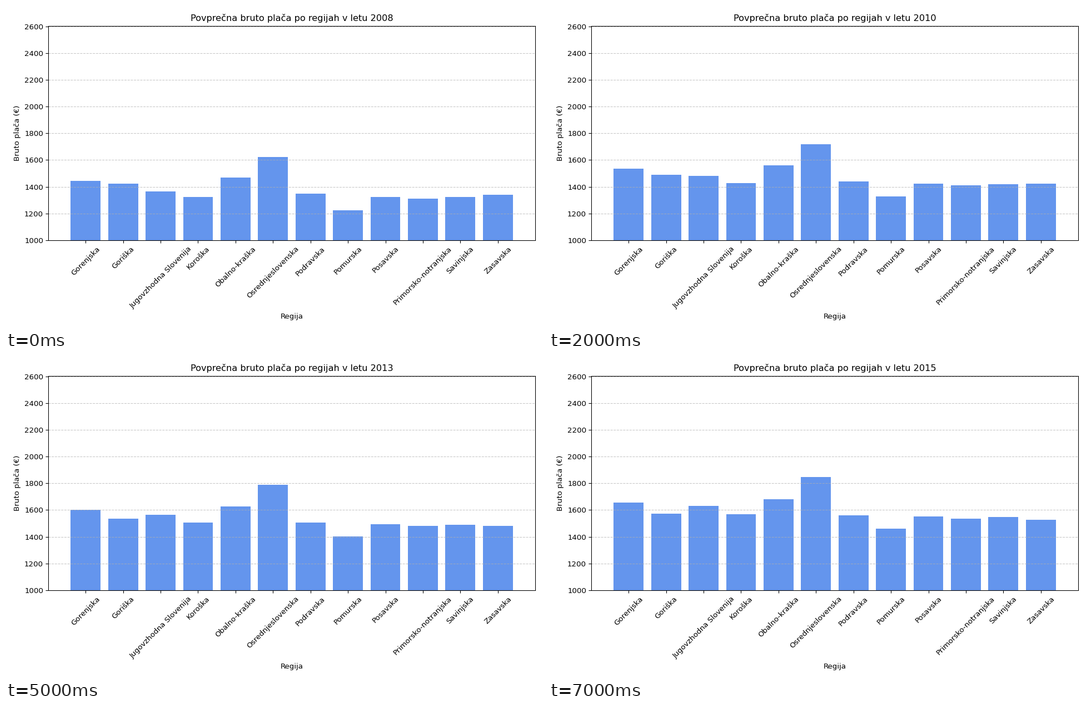
Write a matplotlib script that moves like this. It is 966 px wide and 580 px high and loops after 8000 ms.

```python
import matplotlib.pyplot as plt
import numpy as np
from matplotlib.animation import FuncAnimation

WIDTH, HEIGHT, DPI = 966, 580, 96.6
EPS = 1e-6  # keeps the pixel size from being rounded down
FIRST_YEAR, YEARS = 2008, 8

# Average gross pay in euros: first and last year
PAY = {
    "Gorenjska": (1442, 1657),
    "Goriška": (1424, 1571),
    "Jugovzhodna Slovenija": (1365, 1632),
    "Koroška": (1321, 1568),
    "Obalno-kraška": (1467, 1681),
    "Osrednjeslovenska": (1622, 1847),
    "Podravska": (1348, 1560),
    "Pomurska": (1225, 1459),
    "Posavska": (1321, 1551),
    "Primorsko-notranjska": (1312, 1535),
    "Savinjska": (1321, 1548),
    "Zasavska": (1341, 1527),
}
START, END = np.array(list(PAY.values())).T


def pay_in(year):
    """Pay rises fast at first, stalls, then picks up again."""
    growth = np.interp(year, [0, 1, 3, 5, YEARS - 1], [0, 0.2, 0.67, 0.75, 1])
    return START + (END - START) * growth


plt.rcParams["font.family"] = "DejaVu Sans"
fig, ax = plt.subplots(
    figsize=((WIDTH + EPS) / DPI, (HEIGHT + EPS) / DPI), dpi=DPI)

bars = ax.bar(list(PAY), START, color="cornflowerblue")
title = ax.set_title("")
ax.set_xlabel("Regija")
ax.set_ylabel("Bruto plača (€)")
ax.set_ylim(1000, 2608)
ax.tick_params(axis="x", rotation=45)
ax.grid(axis="y", linestyle="--", alpha=0.7)


def update(year):
    title.set_text(f"Povprečna bruto plača po regijah v letu {FIRST_YEAR + year}")
    for bar, pay in zip(bars, pay_in(year)):
        bar.set_height(pay)
    return [title, *bars]


update(0)
fig.tight_layout()

anim = FuncAnimation(fig, update, frames=YEARS, interval=1000,
                     repeat=True, repeat_delay=0, blit=False)
plt.show()
```
